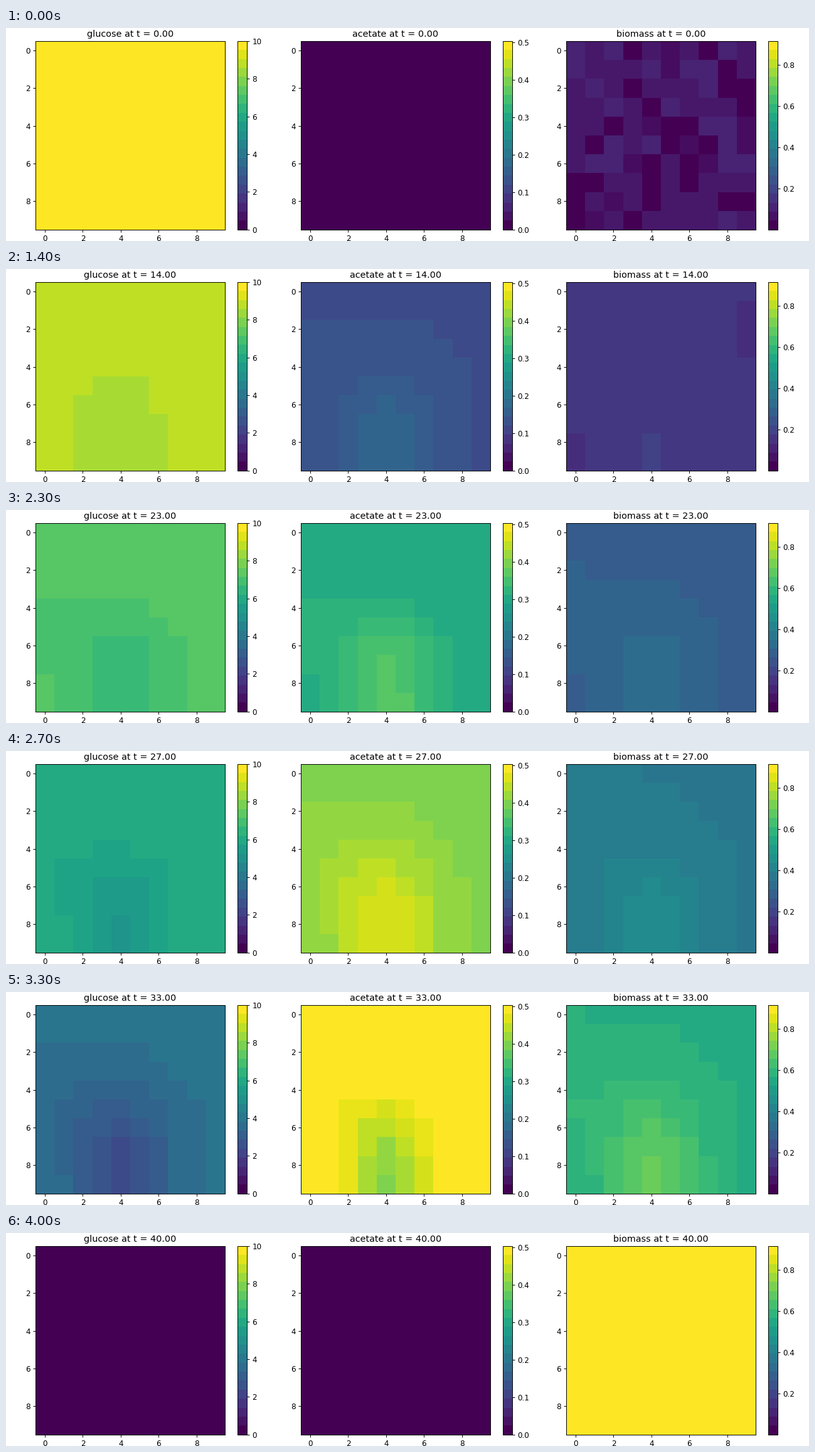
Recreate the animation shown at these times as a matplotlib script. Size 1280 by 341 pixels, loop 4.1 s.

```python
import matplotlib.pyplot as plt
import numpy as np
from matplotlib.animation import FuncAnimation
from matplotlib.cm import ScalarMappable
from matplotlib.colors import Normalize

W, H, DPI = 1280, 341, 64
PX = 72 / DPI  # points per pixel
STEPS = 41
N = 10
SIDE = 301.8
TOP = 20.9

START = 0.061   # biomass at t = 0, as a fraction of full scale
RATE = 0.0718   # growth per time unit

plt.rcParams.update({
    "font.family": "DejaVu Sans",
    "font.size": 12 * PX,
    "axes.titlesize": 14.4 * PX,
    "axes.titlepad": 7.2 * PX,
    "axes.linewidth": 0.96 * PX,
})


def inoculate():
    rng = np.random.default_rng(4)
    return rng.choice([0, 0.045, 0.075, 0.11], size=(N, N), p=[0.35, 0.08, 0.39, 0.18])


def growth_lead():
    """Time units by which each cell runs ahead of the mean growth."""
    row, col = np.mgrid[:N, :N]
    column = np.exp(-((col - 4.1) / 2.6) ** 2) / (1 + np.exp((5.3 - row) / 1.1))
    ridge = np.exp(-((row - 5) / 3) ** 2) * (1 - col / 9)
    return 2.8 * column + 0.7 * ridge - 0.7


def diffuse(u, rate=0.1):
    p = np.pad(u, 1, mode="edge")
    return u + rate * (p[:-2, 1:-1] + p[2:, 1:-1] + p[1:-1, :-2] + p[1:-1, 2:] - 4 * u)


def simulate():
    lead = growth_lead()
    patch = inoculate() - START
    states = []
    for t in range(STEPS):
        local = t + lead * min(1, t / 9)
        grown = START * np.exp(RATE * local)
        eaten = np.clip(1.1 * (grown - START), 0, 1)
        # acetate is released by feeding, then consumed itself
        acetate = 2.3 * eaten - 2.63 * eaten ** 3.8
        noise = patch * np.exp((RATE - 1 / 8) * t)
        states.append((1 - eaten, acetate, grown + noise))
        patch = diffuse(patch)
    return states


def place(x, w):
    return fig.add_axes([x / W, 1 - (TOP + SIDE) / H, w / W, SIDE / H])


def style_ticks(ax):
    ax.tick_params(length=4.2 * PX, width=0.96 * PX, pad=4.2 * PX)


def make_panel(x, top, ticks, fmt):
    ax = place(x, SIDE)
    image = ax.imshow(np.zeros((N, N)), cmap=plt.get_cmap("viridis", 32),
                      vmin=0, vmax=1, aspect="auto", interpolation="nearest")
    ax.set_xticks(range(0, N, 2))
    ax.set_yticks(range(0, N, 2))
    style_ticks(ax)

    scale = ScalarMappable(Normalize(0, top), plt.get_cmap("viridis", 21))
    bar_ax = place(x + 322, SIDE / 20)
    bar = fig.colorbar(scale, cax=bar_ax, ticks=ticks, format=fmt)
    bar.outline.set_linewidth(0.96 * PX)
    style_ticks(bar_ax)
    return image, ax.set_title("")


fig = plt.figure(figsize=(W / DPI, H / DPI), dpi=DPI, facecolor="white")
names = ["glucose", "acetate", "biomass"]
panels = [
    make_panel(47, 10, np.arange(0, 11, 2), "%d"),
    make_panel(470, 0.504, np.arange(6) / 10, "%.1f"),
    make_panel(893, 0.914, np.arange(1, 5) / 5, "%.1f"),
]
states = simulate()


def draw(t):
    for (image, title), name, field in zip(panels, names, states[t]):
        image.set_data(np.clip(field, 0, 1))
        title.set_text(f"{name} at t = {t:.2f}")
    return [artist for panel in panels for artist in panel]


anim = FuncAnimation(fig, draw, frames=STEPS, interval=100, repeat=True, repeat_delay=0)
plt.show()
```
